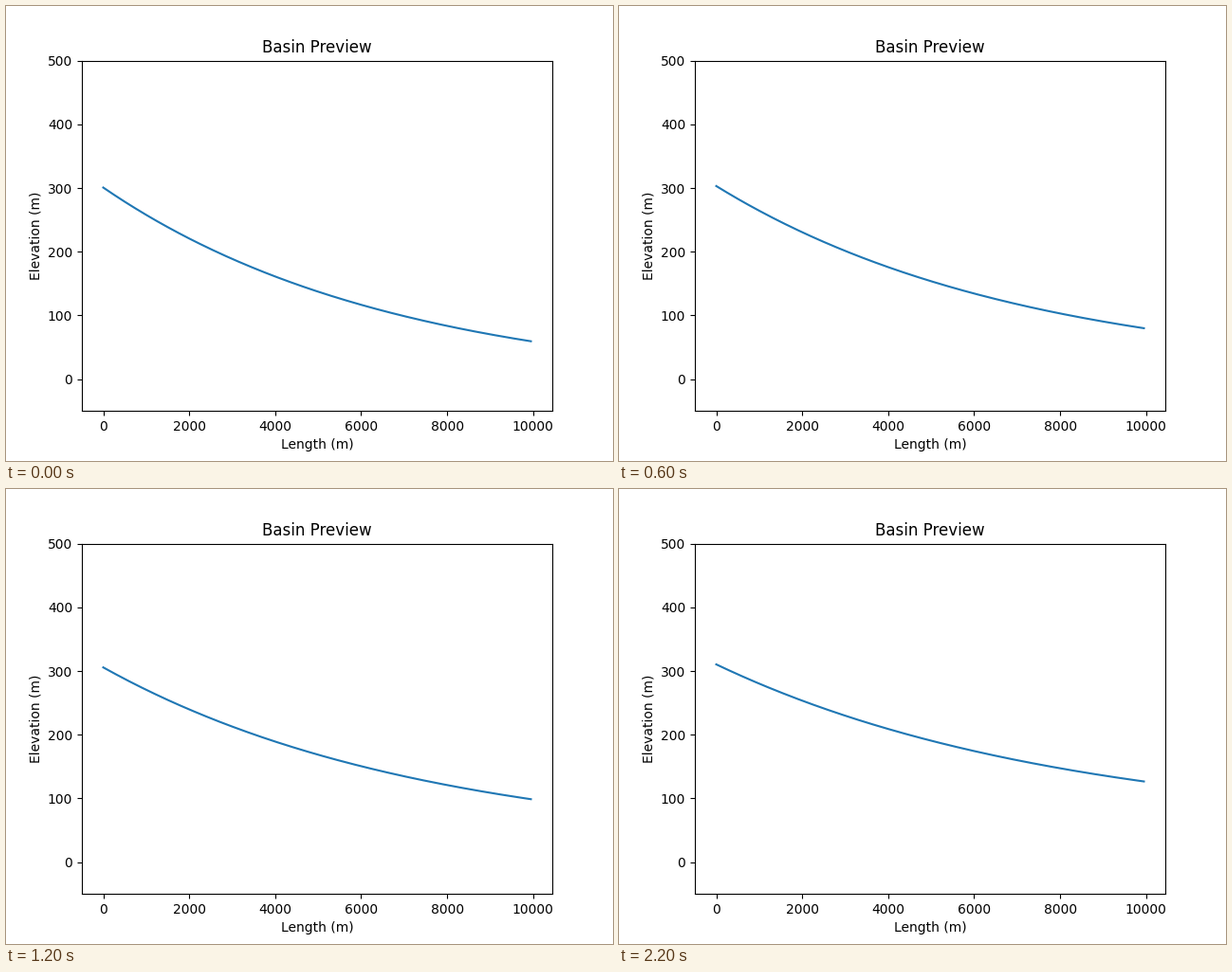
These frames come from a looping animation (640x480 px, 2.4 s). A matplotlib script:

```python
import numpy as np
import matplotlib.pyplot as plt
from matplotlib.animation import FuncAnimation

FRAMES = 12
INTERVAL = 200

x = np.arange(0, 10000, 50)


def profile(step):
    """River bed elevation: an exponential that flattens as the basin fills."""
    head = 300.7 + 0.76 * step + 0.011 * step**2
    mouth = 59.4 + 7.1 * step - 0.09 * step**2
    decay = np.exp(-x / (6800 + 115 * step))
    return mouth + (head - mouth) * (decay - decay[-1]) / (1 - decay[-1])


fig, ax = plt.subplots(figsize=(6.4, 4.8), dpi=100)
line, = ax.plot(x, profile(0))
ax.set_ylim(-50, 500)
ax.set_title("Basin Preview")
ax.set_xlabel("Length (m)")
ax.set_ylabel("Elevation (m)")


def update(step):
    line.set_ydata(profile(step))
    return line,


anim = FuncAnimation(fig, update, frames=FRAMES, interval=INTERVAL,
                     repeat=True, repeat_delay=0)
plt.show()
```
